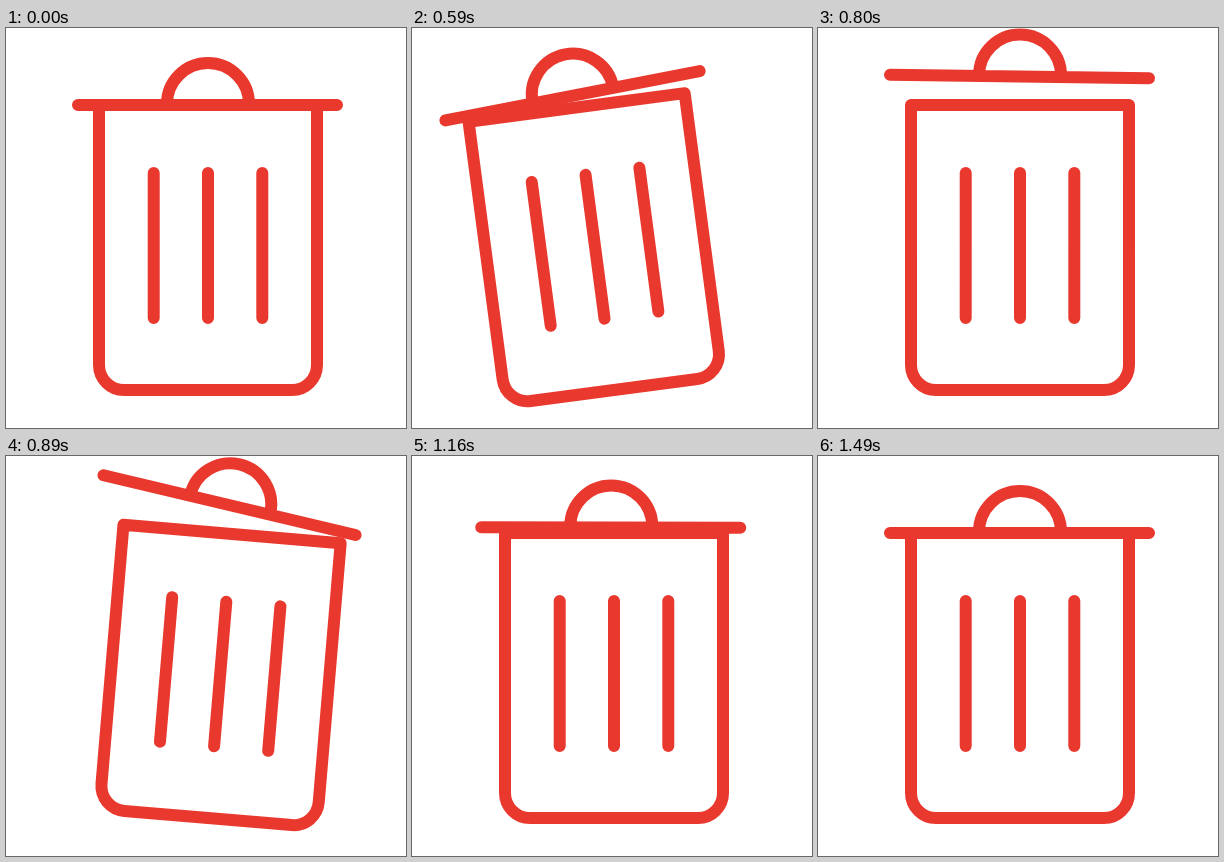
These frames come from a looping animation (400 by 400 pixels, 1.52 s). An HTML page:

```html
<!DOCTYPE html>
<html lang="en">
<head>
<meta charset="utf-8">
<title>Trash can</title>
<style>
  html, body { margin: 0; height: 100%; overflow: hidden; background: #fff; }
  svg { display: block; width: 100vw; height: 100vh; }
  path { fill: none; stroke: #e9382e; stroke-width: 12; stroke-linecap: round; stroke-linejoin: round; }
</style>
</head>
<body>
<svg viewBox="0 0 400 400">
  <g id="can">
    <path d="M93 77H311V337A25 25 0 0 1 286 362H118A25 25 0 0 1 93 337Z"/>
    <path d="M147.7 145V290M202 145V290M256.3 145V290"/>
    <path id="lid" d="M72 77H331M161 76A41 41 0 0 1 243 76"/>
  </g>
</svg>
<script>
  const LOOP = 1520, START = 500, STEP = 30;

  const linear = u => u;
  const quadOut = u => 1 - (1 - u) ** 2;
  const cubicOut = u => 1 - (1 - u) ** 3;
  const cubicInOut = u => u < 0.5 ? 4 * u ** 3 : 1 - 4 * (1 - u) ** 3;
  const sineInOut = u => (1 - Math.cos(Math.PI * u)) / 2;

  // Eased progress from 0 to 1 between two times.
  const ease = (t, from, to, curve) =>
    curve(Math.min(1, Math.max(0, (t - from) / (to - from))));

  // The can tips left, swings over to the right and settles.
  const canTilt = t =>
    -9.5 * ease(t, START, 665, quadOut)
    + 14.5 * ease(t, 690, 887, cubicInOut)
    - 5 * ease(t, 887, 1080, quadOut);

  // The lid pops up, rocks both ways and floats back down.
  const lidTurn = t =>
    -8.5 * ease(t, START, 705, sineInOut)
    + 17 * ease(t, 705, 885, sineInOut)
    - 8.5 * ease(t, 885, 1180, sineInOut);

  const lidY = t =>
    28.5 * (ease(t, 920, 1490, cubicOut) - ease(t, START, 710, linear));

  const lidX = t =>
    -4.7 * ease(t, START, 710, linear)
    + 4.7 * ease(t, 710, 800, sineInOut)
    - 9 * ease(t, 800, 980, sineInOut)
    + 9 * ease(t, 1000, 1490, cubicOut);

  const can = document.getElementById("can");
  const lid = document.getElementById("lid");

  function draw(now) {
    const t = START + Math.floor((now % LOOP - START) / STEP) * STEP;
    can.setAttribute("transform", `rotate(${canTilt(t)} 202 362)`);
    lid.setAttribute("transform",
      `translate(${lidX(t)} ${lidY(t)}) rotate(${lidTurn(t)} 202 77)`);
    requestAnimationFrame(draw);
  }
  draw(performance.now());
</script>
</body>
</html>
```
